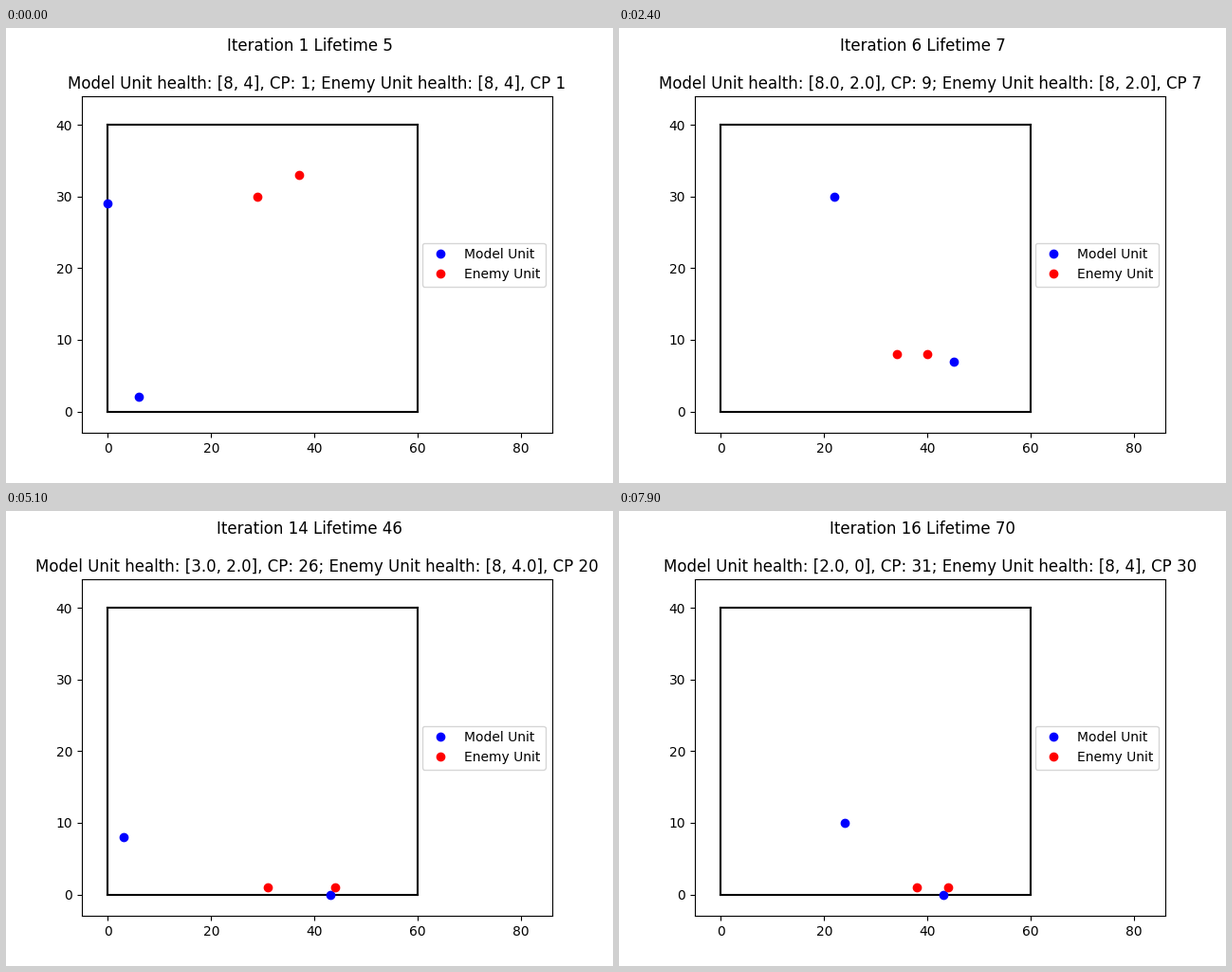
A matplotlib script for the animation above (8000 ms loop, 640 by 480 pixels).

```python
import math

import matplotlib.pyplot as plt
import numpy as np
from matplotlib.animation import FuncAnimation

FRAMES, INTERVAL = 80, 100
FIELD = 60, 40
ROAM, REACH = 12, 25  # iterations and grid units of a random leg
rng = np.random.default_rng(4)


class Unit:
    """Roams in, walks through its spots and roams on, losing health when hit."""

    def __init__(self, full, *spots, hit=99, rate=0.0, least=1.0):
        self.full, self.hit, self.rate, self.least = full, hit, rate, least
        self.fall = hit + full / rate if least == 0 else math.inf
        enter, leave = rng.uniform(-REACH, REACH, (2, 2))
        self.spots = np.clip([spots[0] + enter, *spots, spots[-1] + leave], 0, FIELD)

    def position(self, it, times):
        last = min(times[-1], self.fall)
        times = [times[0] - ROAM, *times[:-1], last, last + ROAM]
        it = min(it, self.fall)
        return [round(np.interp(it, times, axis)) for axis in self.spots.T]

    def health(self, it):
        if it < self.hit:
            return self.full
        lost = int(self.rate * (it - self.hit))
        return max(float(self.full - lost), self.least)


class Team:
    """Gains two command points an iteration and spends one at a steady gap."""

    def __init__(self, *units, spend=99, gap=1):
        self.units, self.spend, self.gap = units, spend, gap

    def points(self, it):
        return 2 * it - 1 - len(range(self.spend, it + 1, self.gap))


# First frame, lifetime, iterations at which spots are met, model, enemy.
LIVES = [
    (0, 5, (1, 14),
     Team(Unit(8, (0, 29), (29, 28), hit=4, rate=0.7),
          Unit(4, (6, 2), (52, 39), hit=5, rate=0.37, least=0), spend=4, gap=4),
     Team(Unit(8, (29, 30), (47, 39), hit=8),
          Unit(4, (37, 33), (18, 20), hit=3, rate=0.8, least=0.0), spend=2, gap=3)),
    (19, 7, (6,),
     Team(Unit(8, (22, 30), hit=4, rate=0.4),
          Unit(4, (45, 7), hit=2, rate=0.5), spend=2, gap=3),
     Team(Unit(8, (34, 8), hit=10, rate=0.5),
          Unit(4, (40, 8), hit=2, rate=0.5), spend=3)),
    (38, 46, (3, 14),
     Team(Unit(8, (3, 19), (3, 8), hit=4, rate=0.5),
          Unit(4, (7, 3), (43, 0), hit=6, rate=0.3, least=0), spend=2, gap=14),
     Team(Unit(8, (26, 27), (31, 1)),
          Unit(4, (31, 28), (44, 1), hit=7), spend=1, gap=2)),
    (64, 70, (5, 16),
     Team(Unit(8, (33, 0), (43, 0), hit=2, rate=0.7, least=2.0),
          Unit(4, (31, 0), (24, 10), hit=3, rate=0.85, least=0)),
     Team(Unit(8, (26, 1), (38, 1)),
          Unit(4, (26, 1), (44, 1)), spend=4, gap=20)),
]

fig, ax = plt.subplots(figsize=(6.4, 4.8), dpi=100)
fig.subplots_adjust(left=0.125, right=0.9, bottom=0.11, top=0.85)
ax.set(xlim=(-5, 86), ylim=(-3, 44))
width, height = FIELD
for x in (0, width):
    ax.plot([x, x], [0, height], "k-")
for y in (0, height):
    ax.plot([0, width], [y, y], "k-")
dots = [ax.plot([], [], style, label=name)[0]
        for style, name in (("bo", "Model Unit"), ("ro", "Enemy Unit"))]
ax.legend(loc="center right")
heading = fig.suptitle("")
status = ax.set_title("")


def draw(frame):
    start, number, times, *teams = [life for life in LIVES if life[0] <= frame][-1]
    it = frame - start + 1
    info = []
    for dot, team in zip(dots, teams):
        dot.set_data(*zip(*(unit.position(it, times) for unit in team.units)))
        info += [[unit.health(it) for unit in team.units], team.points(it)]
    heading.set_text(f"Iteration {it} Lifetime {number}")
    status.set_text("Model Unit health: {}, CP: {}; Enemy Unit health: {}, CP {}".format(*info))
    return [*dots, heading, status]


anim = FuncAnimation(fig, draw, frames=FRAMES, interval=INTERVAL, repeat=True, repeat_delay=0)
plt.show()
```
